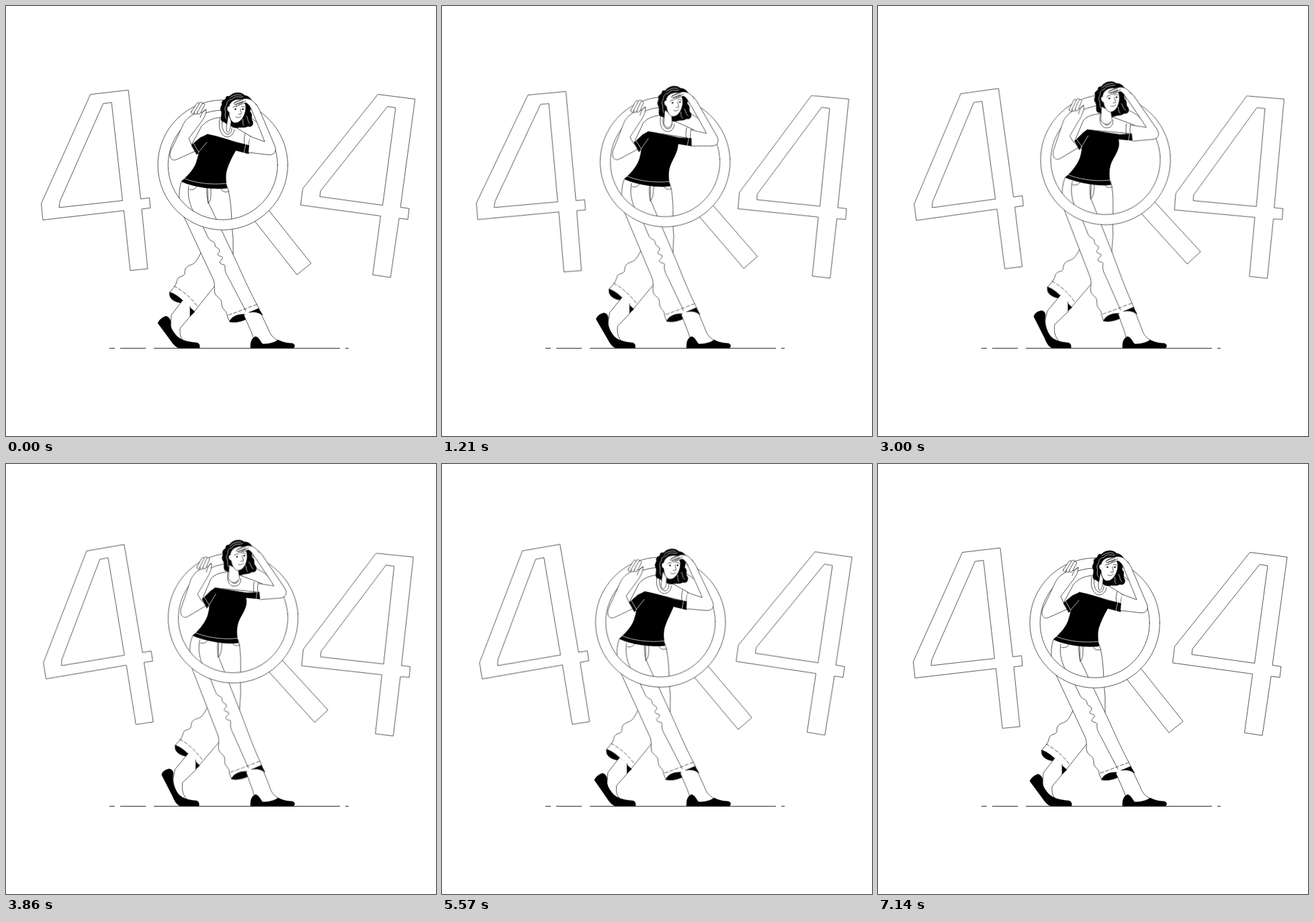
An HTML page that plays this animation: 640 px wide and 640 px high, repeating every 7210 ms.

```html
<!DOCTYPE html>
<html lang="en">
<head>
<meta charset="utf-8">
<title>404</title>
<style>
html, body { margin: 0; width: 100%; height: 100%; overflow: hidden; background: #fff; }
svg { display: block; width: 100%; height: 100%; }
path, circle { fill: #fff; stroke: #111; stroke-width: .7; stroke-linejoin: round; stroke-linecap: round; }
.line { fill: none; }
.ink { fill: #000; stroke: #000; stroke-width: .5; }
.chalk { fill: none; stroke: #fff; }
.dash { fill: none; stroke-dasharray: 5 3; }
#ground { stroke-width: .9; stroke-linecap: butt; }

.move { animation: 7.21s ease infinite; }

/* the two digits swing slowly, each on its own phase */
.sway { animation: 3.605s cubic-bezier(.37, 0, .63, 1) infinite alternate; }
#left { transform-origin: 83px 235px; animation-name: left; animation-delay: -6.04s; }
#right { transform-origin: 605px 240px; animation-name: right; animation-delay: -1.23s; }
@keyframes left { from { transform: rotate(1.27deg); } to { transform: rotate(-3.84deg); } }
@keyframes right { from { transform: rotate(.87deg); } to { transform: rotate(-2.87deg); } }

/* the whole figure leans forward and back */
#glass { transform-origin: 322.7px 236.6px; animation-name: glass; }
@keyframes glass { 50% { transform: translate(16.2px, -7.8px) rotate(-4.16deg); } }
.leg { transform-origin: 0 509px; animation-name: leg; }
@keyframes leg { 50% { transform: skewX(-4.07deg) scaleY(1.03); } }
#shin { transform-origin: 275px 420px; animation-name: shin; }
@keyframes shin { 50% { transform: translate(9px, -6.8px) rotate(2deg); } }
#grip { transform-origin: 296px 158px; animation-name: grip; }
@keyframes grip { 50% { transform: translate(8.8px, -6.2px) rotate(-7deg); } }
#arm { transform-origin: 373px 150px; animation-name: arm; }
@keyframes arm { 50% { transform: translate(4.2px, -18.2px) rotate(-11.8deg); } }
#hand { animation-name: hand; }
@keyframes hand { 50% { transform: translate(4px, -17.2px); } }
#head { transform-origin: 343px 155px; animation-name: head; }
@keyframes head { 50% { transform: translate(3px, -16.6px) rotate(-9deg); } }

/* head and handle trail behind on the way back */
#nod { animation: nod 7.21s ease-in-out infinite; }
@keyframes nod {
  0%, 50%, 97% { transform: none; }
  67% { transform: translateX(-3.5px); }
  78% { transform: translateX(-2.5px); }
}
#handle { transform-origin: 322.7px 236.6px; animation: handle 7.21s ease-in-out infinite; }
@keyframes handle {
  0%, 50%, 98% { transform: none; }
  73% { transform: rotate(-1.3deg); }
}
#open { animation: open 7.21s step-end infinite; }
#shut { animation: shut 7.21s step-end infinite; }
@keyframes open { 0%, 70.4% { opacity: 1; } 66.4% { opacity: 0; } }
@keyframes shut { 0%, 70.4% { opacity: 0; } 66.4% { opacity: 1; } }

/* soft parts bend instead of turning */
#ankle { animation-name: ankle; }
@keyframes ankle { 50% { d: path("M272 430L252 454L249 468C249 480 256 500 272 502C262 492 262 484 263 474L283 455L283 440"); } }
#shoe { animation-name: shoe; }
@keyframes shoe { 50% { d: path("M243 453.5C247 453 250 457 249 462C247 474 251 482 255 489C260 497 270 500 281 501C286 501 288 504 287 509L260 509C254 508 251 501 248 494L232 462C233 457 238 454 243 453.5Z"); } }
#yoke { animation-name: yoke; }
@keyframes yoke { 50% { d: path("M332 160C322 161 312 163 306 170L293 201L312 184L381 190L382 177L352 166Z"); } }
#collar { animation-name: collar; }
@keyframes collar { 50% { d: path("M331 160C328 175 335 182 341 181C347 181 350 177 350 170M335 160C332 170 336 177 341 177C345 177 347 173 347 169"); } }
#shirt { animation-name: shirt; }
@keyframes shirt { 50% { d: path("M312 184C325 186 345 189 360 191L382 190L379 200L358 198C361 208 357 216 350 228C344 238 343 252 347 266C330 269 296 263 279 255C290 246 300 232 302 222C304 214 304 209 304 202Z"); } }
#sleeve { animation-name: sleeve; }
@keyframes sleeve { 50% { d: path("M293 201L306 188L312 184L309 206L300 214Z"); } }
#trim { animation-name: trim; }
@keyframes trim { 50% { d: path("M281 250C296 257 322 262 346 259M296 198L304 210M313 193L301 213M375 188L373 201"); } }
#cuff { animation-name: cuff; }
@keyframes cuff { 50% { d: path("M370 175C369 181 369 186 370 191M376 176C375 181 375 186 376 191"); } }
#neck { animation-name: neck; }
@keyframes neck { 50% { d: path("M328 164L324 184C326 189 329 191 332 191C336 191 339 189 341 186L341 173"); } }
</style>
</head>
<body>
<svg viewBox="0 0 640 640">
  <path id="ground" class="line" d="M154 509.4H162M170 509.4H208M220 509.4H497M505 509.4H510"/>

  <g id="left" class="sway">
    <path d="M126 131.5L182 125L200.5 287L213.5 285.5L215 300.5L202 302L211 391L185 393.5L175.5 304.5L55 318.5L52.5 294.5Z"/>
    <path d="M145 145L157 143.5L173.5 289.5L79 300L80 291.5Z"/>
  </g>
  <g id="right" class="sway">
    <path d="M554 131.5L609 138.5L587 299.5L600 301.5L598 317.5L585 316L572 404L545.5 400L557.5 312.5L438.5 296L441.5 272Z"/>
    <path d="M568.5 149.5L580 151.5L560.5 296.5L467 283.5L468 275.5Z"/>
  </g>

  <!-- far leg -->
  <path class="line move leg" d="M329 268C337 290 335 325 338 345V370M320 271C321 277 327 278 332 276"/>
  <g id="shin" class="move">
    <path d="M293 362C288 371 285 378 281 382C277 386 271 385 268 390C264 395 269 400 262 402C255 404 255 407 254 411C252 418 247 421 243 427L280 455L312 415Z"/>
    <path class="dash" d="M250 417C264 424 276 435 285 447"/>
    <path class="ink" d="M244 426C241 435 251 441 261 442L272 447L273 463L281 455C270 446 258 430 244 426Z"/>
  </g>
  <path id="ankle" class="move" d="M263 438L246 460L245 476C244 486 256 500 268 502C258 494 259 488 259 480L274 462L274 447"/>
  <path id="shoe" class="ink move" d="M237 462C241 461 245 466 245 471C244 479 249 485 254 491C260 497 270 500 282 501C287 501 289 504 288 509L258 509C252 508 248 502 243 495L226 472C228 467 232 464 237 462Z"/>

  <!-- near leg -->
  <g class="move leg">
    <path d="M261 262C255 278 258 298 265 314L309 408C312 418 308 426 313 431C318 436 321 436 321 444C321 452 330 454 329 461L333 470L377 451C358 416 350 395 338 370L301 292L300 270"/>
    <path class="line" d="M272 268C269 285 275 305 292 326L301 345C304 351 310 349 311 355C311 361 318 360 318 364C318 368 313 368 316 371C319 374 323 371 322 376C321 379 316 380 319 383C322 386 327 383 326 389C325 397 331 403 336 414L357 454M284 268C283 273 277 274 273 273M299 270C298 280 300 288 301 294C306 288 305 280 305 271"/>
    <path class="dash" d="M331 460C346 455 360 449 374 444"/>
    <path class="ink" d="M333 470C334 463 345 458 356 459L358 466C350 470 340 472 333 470ZM362 456L376 450L382 460C374 456 369 456 362 456Z"/>
    <path d="M354 460L365 485L372 504L403 504L405 498C396 493 393 488 390 480L380 459C374 455 368 455 362 456"/>
  </g>
  <path class="ink" d="M364 509C364 502 364 496 371 492C377 493 378 499 382 503C392 503 399 501 405 497C413 501 420 502 426 502C431 504 430 507 428 509Z"/>

  <!-- magnifier -->
  <g id="glass" class="move">
    <path id="handle" d="M387 299L454 383L433 400L367 316Z"/>
    <circle cx="322.7" cy="236.6" r="89.1" style="fill:none;stroke:#fff;stroke-width:15.2"/>
    <circle class="line" cx="322.7" cy="236.6" r="96.7"/>
    <circle class="line" cx="322.7" cy="236.6" r="81.5"/>
  </g>

  <!-- shirt -->
  <path id="yoke" class="move" d="M319 166C308 167 299 170 291 179L276 207L300 191L363 208L364 194L341 180Z"/>
  <path id="collar" class="line move" d="M318 168C315 185 322 195 330 195C336 194 339 189 340 184M322 168C320 182 324 190 330 191C335 190 336 186 336 182"/>
  <path id="shirt" class="ink move" d="M300 191C312 193 328 198 342 203L363 208L361 220L342 215C338 222 334 229 330 240C326 250 327 260 329 271C310 274 276 269 261 261C272 252 282 240 284 230C287 222 287 216 287 209Z"/>

  <g id="grip" class="move">
    <path d="M280 161C271 165 266 171 263 178L245 216C242 226 247 232 255 228L284 215L276 206L272 197L291 172C295 166 298 161 298 154L292 158Z"/>
    <path d="M276 157L284 145C287 142 290 145 288 148L280 160C277 161 275 160 276 157Z"/>
    <path d="M280 158L288 145C291 141 294 144 292 148L285 160C282 162 280 161 280 158Z"/>
    <path d="M285 158L291 147C294 143 297 146 295 149L289 160C286 162 284 161 285 158Z"/>
    <path class="line" d="M298 154C294 155 291 160 289 166"/>
  </g>
  <path id="sleeve" class="ink move" d="M276 207L289 196L300 191L293 213L284 221Z"/>
  <path id="trim" class="chalk move" d="M264 256C278 263 306 267 329 264M279 204L287 218M299 203L286 218M357 205L354 219"/>
  <path id="cuff" class="line move" d="M356 190C354 196 354 201 355 206M364 194C362 199 361 203 362 208"/>

  <g id="nod"><g id="head" class="move">
    <path class="ink" d="M333 134C338 128 350 127 355 133C362 134 367 139 366 146L363 157C369 162 363 167 367 171C369 177 365 181 360 179C355 182 350 180 346 181C341 182 336 181 334 177C329 178 326 172 322 172C317 168 323 161 320 156C317 151 323 148 321 144C322 139 327 140 327 137C328 133 331 135 333 134Z"/>
    <path class="chalk" d="M328 168C324 163 328 159 326 154C325 149 330 147 329 143C332 138 336 141 338 137C343 133 349 137 353 135M333 137C338 132 346 131 351 133M363 175C359 172 361 168 358 164M354 178C351 174 354 171 352 168"/>
    <path id="neck" class="move" d="M331 162L328 180C328 184 328 187 330 188C332 188 333 184 334 181L335 172"/>
    <path d="M332 149C328 149 328 156 332 158C332 167 336 174 341 174C349 174 354 165 356 158C358 150 357 143 350 139C342 138 334 141 332 149Z"/>
    <path class="line" d="M349 153C349 157 351 159 350 161L346 161M342 165C345 167 348 166 350 164M338 151C340 149 342 149 344 150M350 150C352 149 354 149 355 151"/>
    <g id="open">
      <circle class="ink" cx="341.5" cy="153.5" r="1"/>
      <circle class="ink" cx="352.5" cy="153.5" r="1"/>
    </g>
    <path id="shut" class="line" d="M339 153.5C340.5 155 342.5 155 344 154M350.5 154C352 155 353.5 155 355 153.5"/>
  </g></g>

  <!-- shading arm -->
  <path id="arm" class="move" d="M361 218L391 221.5C400 222 403 216 400 208L377 154C375 150 373 147 371 145L363 151C365 153 366 156 367 158C372 170 379 186 385 202L363 194"/>
  <g id="hand" class="move">
    <path d="M373 148C369 142 365 139 360 138C353 137 346 140 340 144C338 146 340 147 342 146L353 142L342 147C342 149 345 149 348 147L357 144C361 146 364 150 366 155"/>
    <path class="line" d="M340 144L353 139M346 147L357 141"/>
  </g>
</svg>
</body>
</html>
```
